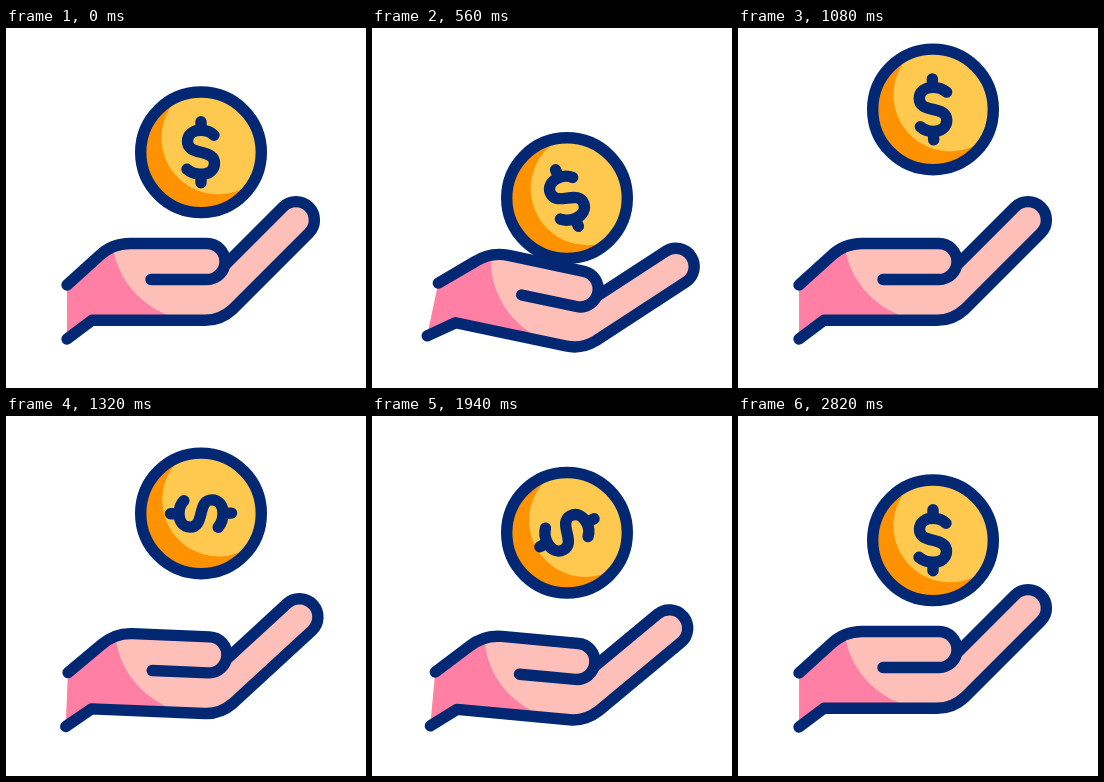
Animation of 360x360 px, one loop 3.02 s. Source, as an HTML page:

```html
<!DOCTYPE html>
<html lang="en">
<head>
<meta charset="utf-8">
<title>Coin toss</title>
<style>
  html, body { margin: 0; width: 100%; height: 100%; overflow: hidden; background: #fff; }
  svg { display: block; width: 100vw; height: 100vh; }
  .line { fill: none; stroke: #022874; stroke-width: 11.4; stroke-linecap: round; stroke-linejoin: round; }
</style>
</head>
<body>
<svg viewBox="0 0 360 360">
  <defs>
    <clipPath id="disc"><circle r="60"/></clipPath>
  </defs>
  <g id="hand">
    <path fill="#ffbfb9" d="M61 257L93 228Q106 215.500 124 215.500H202A18 18 0 0 1 220 236L277 179A18.300 18.300 0 0 1 303 205L227 281Q215 292.300 199 292.300H86L61 311Z"/>
    <path fill="#ff7fa5" d="M61 257L93 228Q99 221 107 219C111 250 134 280 173 291L86 292.300L61 311Z"/>
    <path class="line" d="M61 257L93 228Q106 215.500 124 215.500H201A18 18 0 0 1 201 251.500H145"/>
    <path class="line" d="M220 236L277 179A18.300 18.300 0 0 1 303 205L227 281Q215 292.300 199 292.300H86L61 311"/>
  </g>
  <g id="coin">
    <circle r="60" fill="#ff9200"/>
    <g clip-path="url(#disc)">
      <circle id="shine" cx="17" cy="-14.500" r="56.500" fill="#ffc950"/>
    </g>
    <circle class="line" r="60.300"/>
    <path id="sign" class="line" d="M13 -17C9 -21 5 -22 0 -22C-8 -22 -13.500 -17.500 -13.500 -11C-13.500 -4 -8 -2 0 0C8 2 13.500 4 13.500 11C13.500 17.500 8 22 0 22C-5 22 -10 20.500 -14 17M0 -30.500V-22M0 30.500V22"/>
  </g>
</svg>
<script>
const LOOP = 3020, START = 220, END = 2820;
const PERIOD = 1100;            // from one throw to the next
const HIT = 650;                // hand at its lowest
const RELEASE = 675;            // coin leaves the hand
const RISE = 385, FALL = 633;   // flight up and down
const TURN = 1060;              // one full turn of the sign
const SETTLE = 2380;            // last turn starts to slow down
const REST_Y = 124, LOW_Y = 176, TOP_Y = 81;
const DIP = 15, WIND_UP = -25;

const el = id => document.getElementById(id);
const hand = el('hand'), coin = el('coin'), shine = el('shine'), sign = el('sign');

const clamp = u => Math.min(1, Math.max(0, u));
const mix = (a, b, u) => a + (b - a) * u;
const ease = u => (1 - Math.cos(Math.PI * clamp(u))) / 2;
const easeOut = u => Math.sin(Math.PI / 2 * clamp(u));
const sink = t => ease((t - START) / 440);

// The hand gives way under the coin, then springs back.
function dip(t, hit, time) {
  return DIP * (t < hit ? clamp(1 - (hit - t) / time) : 1 - ease((t - hit) / 320));
}
const tilt = t => dip(t, HIT, HIT - START) + dip(t, HIT + PERIOD, 510);

function height(t) {
  if (t < RELEASE) return mix(REST_Y, LOW_Y, sink(t));
  const lastTop = RELEASE + PERIOD + RISE;
  if (t > lastTop) return mix(TOP_Y, REST_Y, ease((t - lastTop) / 560));
  const p = (t - RELEASE) % PERIOD;
  if (p < RISE) return mix(LOW_Y, TOP_Y, easeOut(p / RISE));
  return mix(TOP_Y, LOW_Y, clamp((p - RISE) / FALL) ** 2);
}

function spin(t) {
  if (t < RELEASE) return WIND_UP * sink(t);
  if (t <= SETTLE) return WIND_UP + 360 * easeOut((t - RELEASE) % PERIOD / TURN);
  const left = 1 - clamp((t - SETTLE) / (END - SETTLE));
  return mix(360, spin(SETTLE), left * left);
}

function draw(t) {
  const a = tilt(t);
  hand.setAttribute('transform', `rotate(${a} 73 281.6)`);
  coin.setAttribute('transform', `translate(195 ${height(t) + 0.3})`);
  shine.setAttribute('transform', `rotate(${a * 1.3})`);
  sign.setAttribute('transform', `rotate(${spin(t)})`);
}

const begin = performance.now();
function tick() {
  draw((performance.now() - begin) % LOOP);
  requestAnimationFrame(tick);
}
draw(0);
requestAnimationFrame(tick);
</script>
</body>
</html>
```
